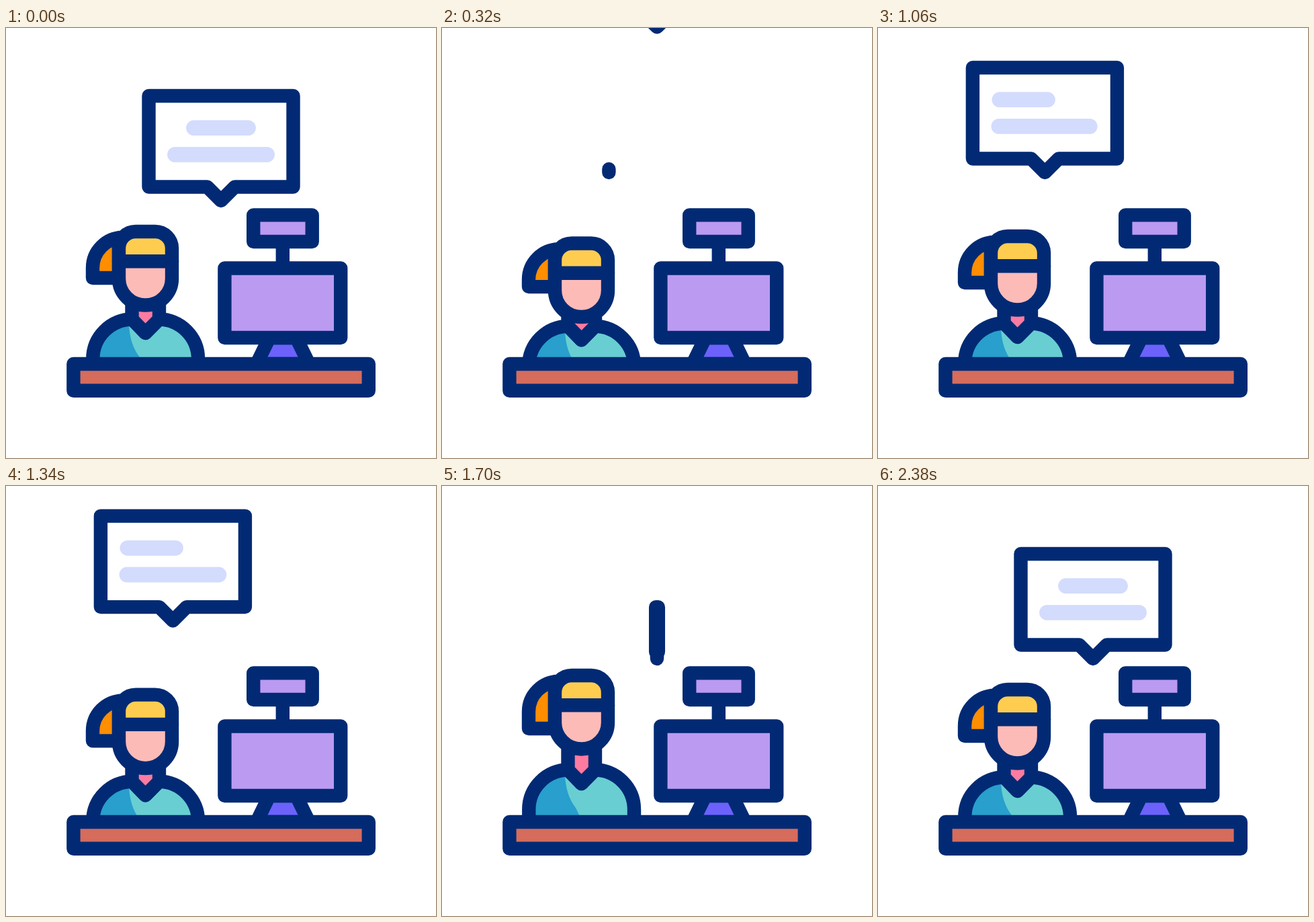
Write an HTML page with a canvas that moves like this. It is 640 px wide and 640 px high and loops after 2.62 s.

```html
<!DOCTYPE html>
<html lang="en">
<head>
<meta charset="utf-8">
<title>Cashier desk</title>
<style>
  html, body { margin: 0; width: 100%; height: 100%; overflow: hidden; background: #fff; }
  canvas { display: block; width: 100vw; height: 100vh; }
</style>
</head>
<body>
<canvas id="stage" width="640" height="640"></canvas>
<script>
const ctx = document.getElementById('stage').getContext('2d');
const LOOP = 2620, STEP = 20, HALF = 1300;
const NAVY = '#022a74', LILAC = '#bb9af2', BAR = '#d3dcfd';
const LINE = 20.4;

const ease = (t, start, end) => {
  const u = Math.min(1, Math.max(0, (t - start) / (end - start)));
  return (1 - Math.cos(Math.PI * u)) / 2;
};
const mix = (a, b, k) => a + (b - a) * k;

function shape(d, fill, stroke = NAVY) {
  const path = new Path2D(d);
  if (fill) { ctx.fillStyle = fill; ctx.fill(path); }
  if (stroke) { ctx.strokeStyle = stroke; ctx.lineWidth = LINE; ctx.stroke(path); }
}

const box = (x1, y1, x2, y2) => `M${x1} ${y1}H${x2}V${y2}H${x1}Z`;

function bar(x1, x2, y, k) {
  if (k <= 0) return;
  ctx.strokeStyle = BAR;
  ctx.lineWidth = 22.8;
  ctx.beginPath();
  ctx.moveTo(x1, y);
  ctx.lineTo(mix(x1, x2, k), y);
  ctx.stroke();
}

// The tip of the bubble is its origin; t counts from the start of its half.
function bubble(x, y, t, lift, shortBar) {
  if (t < 300) return;
  const sx = 107.5 * ease(t, 360, 840);
  const sy = 1.224 * ease(t, 295, 535) - 0.224 * ease(t, 540, 760);
  const notch = 20.5 * sx / 107.5, low = -20.5 * sy, top = -156 * sy;
  ctx.save();
  ctx.translate(x, y - lift);
  shape(`M0 0L${-notch} ${low}H${-sx}V${top}H${sx}V${low}H${notch}Z`, '#fff');
  bar(shortBar[0], shortBar[1], -108.3, ease(t, 720, 860));
  bar(-68.5, 68.5, -68.6, ease(t, 800, 1080));
  ctx.restore();
}

const liftOff = t => 305 * ease(t, 0, 430);

// Crouch, jump, settle.
function hop(t, from, dip, peak, to) {
  if (t < 300) return mix(from, dip, ease(t, 0, 300));
  if (t < 420) return mix(dip, peak, ease(t, 300, 420));
  return mix(peak, to, ease(t, 420, 860));
}

function person(time) {
  const second = time >= HALF, t = second ? time - HALF : time;
  const move = (dip, peak, rest) => hop(t, second ? rest : 0, dip, peak, second ? 0 : rest);
  const head = move(20.5, -24, 7);
  const hair = move(15, -12.8, 7);
  const body = move(12, -12.6, 6);
  const shoulder = 433.5 + body, arm = 492.5 + body, collar = 454 + body;
  const torso = `M129.3 505V${arm}A59 59 0 0 1 188 ${shoulder}L207.5 ${collar}L227.5 ${shoulder}A59 59 0 0 1 286 ${arm}V505Z`;

  shape(torso, '#68ced2', null);
  ctx.save();
  ctx.clip(new Path2D(torso));
  shape(`M120 420H183V${440 + body}Q184 471 199 ${490 + body}L214 510H120Z`.replace('Q184 471', `Q184 ${471 + body}`), '#289fcc', null);
  ctx.restore();
  shape(torso);

  shape(`M187.5 ${405 + head}V${shoulder}L207.5 ${collar}L228 ${shoulder}V${405 + head}`, '#fd7ba0');
  shape(`M174 ${312 + head}A45 45 0 0 0 129 ${357 + head}V${372 + hair}H168V${312 + head}`, '#ff8e00');

  const skull = `M168 ${373 + head}v-45a25 25 0 0 1 25 -25h29a25 25 0 0 1 25 25v45a39.5 39.5 0 0 1 -79 0Z`;
  shape(skull, '#fdbbb8', null);
  ctx.save();
  ctx.clip(new Path2D(skull));
  shape(box(160, 290 + head, 255, 347 + head), '#fecd50', null);
  ctx.restore();
  shape(skull);
  shape(`M168 ${347.3 + head}H247`);
}

function desk() {
  shape('M392 461L373 500H451L432 461Z', '#6c62fb');
  shape('M411.8 318V357');
  shape(box(368.2, 278.4, 455.7, 318), LILAC);
  shape(box(325.4, 357.5, 498.2, 461), LILAC);
  shape(box(100.4, 500, 539.8, 539.7), '#d56c5c');
}

function draw(t) {
  ctx.fillStyle = '#fff';
  ctx.fillRect(0, 0, 640, 640);
  ctx.lineCap = ctx.lineJoin = 'round';

  if (t < HALF) bubble(320, 257, LOOP, liftOff(t), [-40.5, 40.5]);
  else bubble(320, 257, t - HALF, 0, [-40.5, 40.5]);
  if (t < 1600) bubble(248.4, 215, t, liftOff(t - 1280), [-67.5, 4]);

  person(t);
  desk();
}

const begin = performance.now();
function tick() {
  const t = (performance.now() - begin) % LOOP;
  draw(Math.floor(t / STEP) * STEP);
  requestAnimationFrame(tick);
}
tick();
</script>
</body>
</html>
```
